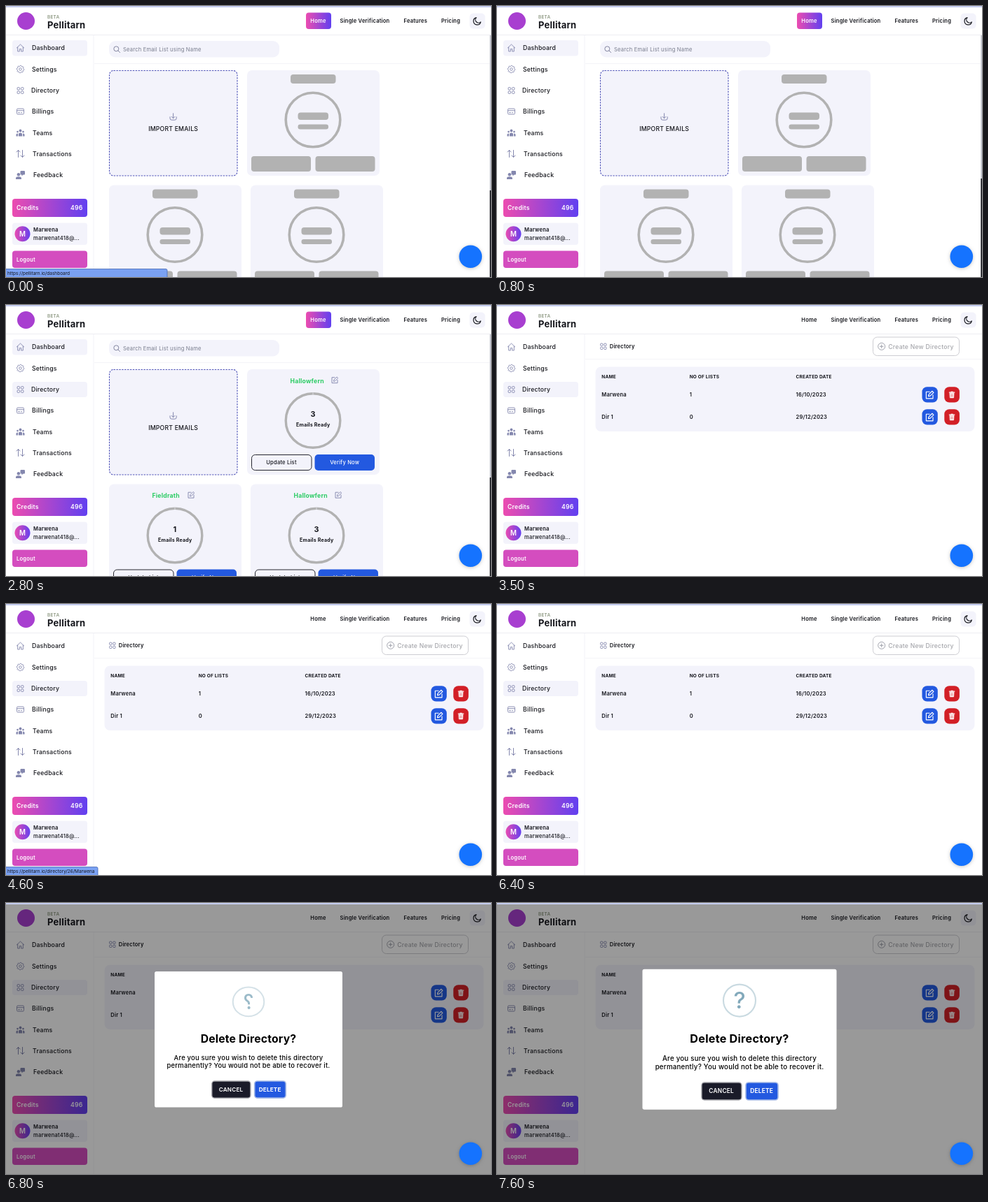
Write an HTML page with a canvas that moves like this. It is 692 by 388 pixels and loops after 8 s.

```html
<!DOCTYPE html>
<html lang="en">
<head>
<meta charset="utf-8">
<title>Directory dashboard</title>
<style>
  html, body { margin: 0; width: 100%; height: 100%; overflow: hidden; background: #fff; }
  canvas { display: block; width: 692px; height: 388px; }
</style>
</head>
<body>
<canvas id="stage"></canvas>
<script>
const W = 692, H = 388, LOOP = 8000, STEP = 100;
const canvas = document.getElementById('stage');
const ctx = canvas.getContext('2d');
const dpr = window.devicePixelRatio || 1;
canvas.width = W * dpr;
canvas.height = H * dpr;

const INK = '#15161c', PANEL = '#f3f3fb', ICON = '#8487ae', GREY = '#b2b2b2';
const BLUE = '#2359e0', RED = '#d21f26';
const BRAND = 'Pellitarn', USER = 'Marwena', SITE = 'https://pellitarn.io/';
const HOVER_AT = 2500, LOAD_AT = 2000, PAGE_AT = 3000, MODAL_AT = 6550;
// Type sizes of the page
const XS = 6.49, SM = 7.57, MD = 8.66;

const clamp = v => Math.max(0, Math.min(1, v));
const ease = p => 1 - Math.pow(1 - clamp(p), 2.3);
const mix = (a, b, p) => a + (b - a) * p;

function box(x, y, w, h, r, fill, stroke, width = 1) {
  ctx.beginPath();
  ctx.roundRect(x, y, w, h, r);
  paint(fill, stroke, width);
}

function disc(x, y, r, fill, stroke, width = 1) {
  ctx.beginPath();
  ctx.arc(x, y, r, 0, Math.PI * 2);
  paint(fill, stroke, width);
}

function paint(fill, stroke, width) {
  if (fill) { ctx.fillStyle = fill; ctx.fill(); }
  if (stroke) { ctx.strokeStyle = stroke; ctx.lineWidth = width; ctx.stroke(); }
}

// y is the middle of the capitals
function text(str, x, y, size, weight = 600, color = INK, align = 'left', gap = 0.216) {
  ctx.font = `${weight} ${size}px Inter, sans-serif`;
  ctx.letterSpacing = gap + 'px';
  ctx.textAlign = align;
  ctx.fillStyle = color;
  ctx.fillText(str, x, y + size * 0.364);
}

function path(d, x, y, stroke, width = 1, fill) {
  ctx.save();
  ctx.translate(x, y);
  ctx.lineCap = ctx.lineJoin = 'round';
  const shape = new Path2D(d);
  if (fill) { ctx.fillStyle = fill; ctx.fill(shape); }
  if (stroke) { ctx.strokeStyle = stroke; ctx.lineWidth = width; ctx.stroke(shape); }
  ctx.restore();
}

function pinkToViolet(x0, x1) {
  const g = ctx.createLinearGradient(x0, 0, x1, 0);
  g.addColorStop(0, '#ec4cb0');
  g.addColorStop(1, '#6140f0');
  return g;
}

function gridIcon(x, y, s = 1) {
  for (const i of [-1, 1]) for (const j of [-1, 1])
    box(x + (i * 2.7 - 1.75) * s, y + (j * 2.7 - 1.75) * s, 3.5 * s, 3.5 * s, 1, null, ICON, 0.9);
}

function gearIcon(x, y) {
  ctx.beginPath();
  for (let i = 0; i < 32; i++) {
    const a = i / 32 * Math.PI * 2, r = i % 4 < 2 ? 5.3 : 4.3;
    ctx.lineTo(x + r * Math.cos(a), y + r * Math.sin(a));
  }
  ctx.closePath();
  paint(null, ICON, 0.9);
  disc(x, y, 1.8, null, ICON, 0.9);
}

function cardIcon(x, y) {
  box(x - 5, y - 4, 10, 8, 1.4, null, ICON, 0.9);
  path('M-5-1.3H5M-3 1.7H-1M1 1.7H2', x, y, ICON, 0.9);
}

function teamIcon(x, y) {
  disc(x, y - 3, 1.9, ICON);
  for (const s of [-1, 1]) disc(x + s * 4, y - 1.4, 1.3, ICON);
  path('M-2.6 5V2.2Q-2.6 0 0 0T2.6 2.2V5ZM-6 5V2.7Q-6 .8-3.6 .9V5ZM6 5V2.7Q6 .8 3.6 .9V5Z', x, y, null, 0, ICON);
}

function feedbackIcon(x, y) {
  box(x, y - 6, 6.5, 5.6, 1.2, ICON);
  path('M2-1V1.5L4.5-1Z', x, y, null, 0, ICON);
  disc(x - 2.6, y - 0.7, 2.2, ICON);
  path('M-6.5 6V4.6Q-6.5 2.2-2.6 2.2T1.4 4.6V6Z', x, y, null, 0, ICON);
}

function editIcon(x, y, color, s = 1) {
  ctx.save();
  ctx.translate(x, y);
  ctx.scale(s, s);
  path('M0-4H-4.2V4.4H4.2V0M-1.5 1.6L-1-.6L3.2-4.8L5-3L.8 1.1Z', 0, 0, color, 1);
  ctx.restore();
}

function trashIcon(x, y) {
  path('M-3-2.2H3L2.5 4.4H-2.5Z', x, y, '#fff', 0.6, '#fff');
  path('M-3.8-3.4H3.8M-1.2-4.3H1.2', x, y, '#fff', 1.1);
  path('M-.9-.7V2.8M.9-.7V2.8', x, y, RED, 0.6);
}

const MENU = [
  ['Dashboard', 37, 60, (x, y) => path('M-5.2 0L0-5L5.2 0M-3.8-1V5H-1.2V1.6H1.2V5H3.8V-1', x, y, ICON, 0.9)],
  ['Settings', 37, 90.5, gearIcon],
  ['Directory', 36, 121, gridIcon],
  ['Billings', 37, 151, cardIcon],
  ['Teams', 38, 181.5, teamIcon],
  ['Transactions', 38, 211.5, (x, y) => path('M-3 5V-5M-5.5-2.5L-3-5L-.5-2.5M3-5V5M.5 2.5L3 5L5.5 2.5', x, y, ICON, 1)],
  ['Feedback', 39, 242, feedbackIcon]
];

function header(home) {
  ctx.fillStyle = '#ededf2';
  ctx.fillRect(0, 41, W, 1);
  disc(28.5, 21.5, 12.5, '#a83fd0');
  text('BETA', 59, 15.5, XS, 500, '#7f8c72');
  text(BRAND, 59, 27.3, 12.98, 700);
  if (home) box(428, 9.5, 36, 23.5, 4, pinkToViolet(428, 464));
  text('Home', 434.3, 21.3, SM, 600, home ? '#fff' : INK);
  text('Single Verification', 476.5, 21.3, SM);
  text('Features', 567.5, 21.3, SM);
  text('Pricing', 621, 21.3, SM);
  box(661.5, 10.5, 22, 22, 5, PANEL);
  path('M5 1.2A5.2 5.2 0 1 1-1.2-5A4.2 4.2 0 0 0 5 1.2Z', 672.3, 21.6, INK, 1.2);
}

function sidebar(home, hover) {
  ctx.fillStyle = '#f4f4f7';
  ctx.fillRect(124.5, 42, 1, H - 42);
  if (home) box(9, 49, 107, 22.5, 4, PANEL);
  ctx.globalAlpha = hover;
  box(9, 110, 107, 22, 4, PANEL);
  ctx.globalAlpha = 1;
  for (const [label, x, y, icon] of MENU) {
    icon(20.5, y);
    text(label, x, y, MD, 500);
  }
  box(9, 276, 107, 26, 4, pinkToViolet(9, 116));
  text('Credits', 15, 289, MD, 600, '#fff');
  text('496', 109.5, 289, MD, 600, '#fff', 'right');
  box(9, 310.5, 107, 31.5, 4, PANEL);
  disc(23.5, 326.3, 11, pinkToViolet(12, 35));
  text(USER[0], 23.6, 326.3, 9.7, 600, '#fff', 'center');
  text(USER, 39, 320.7, SM);
  text('marwenat418@...', 39, 332, SM, 500);
  box(9, 350.5, 107, 24.5, 4, '#d44dbf');
  text('Logout', 15, 363, SM, 600, '#fff');
}

function listCard(x, y, name, count, penX, loaded) {
  box(x, y, 189, 151, 7, PANEL);
  if (!loaded) {
    box(x + 62, y + 6, 64.5, 13, 4, GREY);
    disc(x + 94, y + 71, 38.8, null, GREY, 3.6);
    box(x + 72.5, y + 60.5, 43.5, 10.5, 4, GREY);
    box(x + 72.5, y + 77.5, 43.5, 7, 3.3, GREY);
    box(x + 6, y + 123, 85, 22, 4, GREY);
    box(x + 97.5, y + 123, 85, 22, 4, GREY);
    return;
  }
  text(name, x + 61.5, y + 16.7, MD, 700, '#2bcc64');
  editIcon(x + penX, y + 15.5, ICON, 0.95);
  disc(x + 94, y + 73.5, 38.8, null, GREY, 3.4);
  ctx.fillStyle = '#e4e4ea';
  ctx.fillRect(x + 93.6, y + 33, 0.8, 3.4);
  text(count, x + 94, y + 64.5, 10.82, 700, INK, 'center');
  text('Emails Ready', x + 94.2, y + 79.5, 7.03, 700, INK, 'center');
  box(x + 6.5, y + 122.5, 85.5, 22, 5, null, '#26272f', 1);
  text('Update List', x + 49, y + 133.5, SM, 500, INK, 'center');
  box(x + 96.5, y + 122, 85.5, 23, 5, BLUE);
  text('Verify Now', x + 139.2, y + 133.5, SM, 500, '#fff', 'center');
}

function homePage(t) {
  ctx.fillStyle = '#f4f4f7';
  ctx.fillRect(126, 82, 564, 1);
  box(147, 50, 243, 23.5, 9, PANEL);
  disc(157.3, 61.3, 3.5, null, '#8385a0', 1);
  path('M0 0L2.7 2.7', 159.9, 63.9, '#8385a0', 1);
  text('Search Email List using Name', 167, 62, SM, 400, '#777b8c');

  ctx.setLineDash([2.4, 1.5]);
  box(147.5, 92.5, 182.5, 150.5, 6, PANEL, '#4f53b8', 1.1);
  ctx.setLineDash([]);
  path('M0-5V2M-2.4-.4L0 2L2.4-.4M-4.6 0V2Q-4.6 4.4-2.2 4.4H2.2Q4.6 4.4 4.6 2V0', 238.6, 158.8, ICON, 1);
  text('IMPORT EMAILS', 238.6, 176, MD, 500, INK, 'center');

  const loaded = t >= LOAD_AT;
  listCard(344, 92, 'Hallowfern', '3', 125, loaded);
  listCard(147, 256.5, 'Fieldrath', '1', 117, loaded);
  listCard(349, 256.5, 'Hallowfern', '3', 125, loaded);

  const split = t < 800 ? 264 : 247;
  ctx.fillStyle = '#c3c5cf';
  ctx.fillRect(690.3, 42, 1.7, split - 42);
  ctx.fillStyle = '#1b1c22';
  ctx.fillRect(690.3, split, 1.7, H - split);
}

function directoryPage() {
  ctx.fillStyle = '#f4f4f7';
  ctx.fillRect(126, 77, 566, 1);
  gridIcon(151.8, 59.3, 0.95);
  text('Directory', 160.7, 59.5, SM);
  box(536.5, 46, 123, 26.5, 6, null, '#cdcdd2', 1);
  disc(548.7, 59.3, 5, null, '#9698a3', 0.9);
  path('M-2.3 0H2.3M0-2.3V2.3', 548.7, 59.3, '#9698a3', 0.9);
  text('Create New Directory', 558.3, 59.5, MD, 500, '#a6a7ac');

  box(140.5, 88.5, 541, 92.5, 8, PANEL);
  const cols = [149.3, 274.7, 426.5];
  const row = (cells, y, size, weight) =>
    cells.forEach((cell, i) => text(cell, cols[i], y, size, weight));
  row(['NAME', 'NO OF LISTS', 'CREATED DATE'], 102.5, XS, 700);
  [[USER, '1', '16/10/2023'], ['Dir 1', '0', '29/12/2023']].forEach((cells, i) => {
    const y = 128.5 + i * 32;
    row(cells, y, SM, 600);
    box(606.5, y - 11.2, 22.3, 22.3, 7, BLUE);
    editIcon(617.2, y + 0.3, '#fff', 1.15);
    box(638.3, y - 11.2, 21.6, 22.3, 7, RED);
    trashIcon(649.1, y);
  });
}

function status(page, width, alpha) {
  if (alpha <= 0) return;
  ctx.globalAlpha = alpha;
  box(-2, 376.5, width + 2, 14, 2, '#7aa1f2', '#4668b4', 0.8);
  text(SITE + page, 2, 382.8, XS, 400, INK, 'left', 0);
  ctx.globalAlpha = 1;
}

function popScale(age) {
  const p = clamp(age / 300);
  if (p < 0.45) return mix(0.7, 1.05, ease(p / 0.45));
  if (p < 0.8) return mix(1.05, 0.95, ease((p - 0.45) / 0.35));
  return mix(0.95, 1, ease((p - 0.8) / 0.2));
}

function questionIcon(age) {
  const p = ease(age / 500);
  const tilt = Math.cos((1 - p) * 100 * Math.PI / 180);
  const spin = Math.cos((1 - ease(age / 800)) * Math.PI * 2);
  ctx.save();
  ctx.globalAlpha = age < 60 ? 0 : p;
  ctx.translate(0, -55.7);
  ctx.scale(1, tilt);
  disc(0, 0, 23, null, '#c9dae1', 2.1);
  ctx.scale(spin, 1);
  text('?', 0, 0, 32.5, 500, '#82a9bb', 'center', 0);
  ctx.restore();
}

function modal(age) {
  ctx.fillStyle = `rgba(0,0,0,${0.4 * clamp(age / 90)})`;
  ctx.fillRect(0, 2, W, H - 2);
  const s = popScale(age);
  ctx.save();
  ctx.translate(346, 195.3);
  ctx.scale(s, s);
  box(-138.5, -100.5, 277, 201, 2.7, '#fff');
  questionIcon(age);
  text('Delete Directory?', 0, -1, 16.23, 700, '#000', 'center');
  text('Are you sure you wish to delete this directory', 0, 26.7, 9.74, 500, '#000', 'center');
  text('permanently? You would not be able to recover it.', 0, 38.7, 9.74, 500, '#000', 'center');
  box(-54, 61.7, 57, 25, 4, '#1a1b29', '#a5a5ab', 1.4);
  text('CANCEL', -25.8, 74, 8.4, 600, '#fff', 'center');
  box(9, 61.7, 46, 25, 4, BLUE, '#a3b8e6', 1.7);
  text('DELETE', 31.7, 74, 8.4, 700, '#fff', 'center');
  ctx.restore();
}

function chatBubble() {
  ctx.save();
  ctx.shadowColor = 'rgba(0,0,0,.22)';
  ctx.shadowBlur = 5 * dpr;
  ctx.shadowOffsetY = dpr;
  disc(662.8, 358.8, 16.3, '#1573ff');
  ctx.restore();
}

function draw(t) {
  const home = t < PAGE_AT;
  ctx.setTransform(dpr, 0, 0, dpr, 0, 0);
  ctx.fillStyle = '#fff';
  ctx.fillRect(0, 0, W, H);
  header(home);
  sidebar(home, clamp((t - HOVER_AT + STEP) / 200));
  if (home) homePage(t); else directoryPage();
  status('dashboard', 230, home ? clamp(1 - t / 400) : 0);
  status('directory/26/' + USER, 131, clamp((t - 4000) / 300) * clamp((5400 - t) / 300));
  if (t >= 6600) modal(t - MODAL_AT);
  ctx.fillStyle = '#c6cef0';
  ctx.fillRect(0, 0, W, 2);
  chatBubble();
}

const start = performance.now();
function tick() {
  const t = (performance.now() - start) % LOOP;
  draw(Math.floor(t / STEP) * STEP);
  requestAnimationFrame(tick);
}
tick();
</script>
</body>
</html>
```
